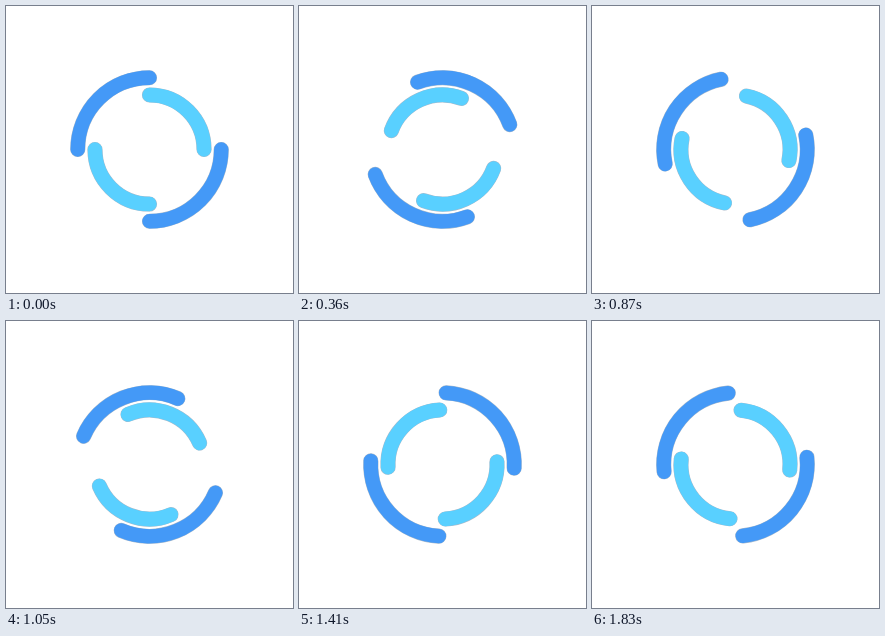
Write an HTML page with a canvas that moves like this. It is 287 by 287 pixels and loops after 1860 ms.

```html
<!DOCTYPE html>
<html lang="en">
<head>
<meta charset="utf-8">
<title>Double ring spinner</title>
<style>
  html, body { margin: 0; width: 100%; height: 100%; overflow: hidden; background: #fff; }
  canvas { display: block; width: 287px; height: 287px; }
</style>
</head>
<body>
<canvas id="stage"></canvas>
<script>
const SIZE = 287, UNIT = SIZE / 100;
const LOOP = 1860, STEP = 30;
const QUARTER = Math.PI / 2;
const WIDTH = 5 * UNIT, RIM = 0.8;
const canvas = document.getElementById('stage');
const ctx = canvas.getContext('2d');
const dpr = window.devicePixelRatio || 1;

canvas.width = canvas.height = Math.round(SIZE * dpr);
ctx.scale(dpr, dpr);
ctx.lineCap = 'round';

function stroke(color, width) {
  ctx.strokeStyle = color;
  ctx.lineWidth = width;
  ctx.stroke();
}

// Two opposite quarter arcs with round ends and a fine grey rim
function ring(radius, color, start) {
  for (const a of [start, start + Math.PI]) {
    ctx.beginPath();
    ctx.arc(SIZE / 2, SIZE / 2, radius * UNIT, a, a + QUARTER);
    stroke('#a9b9c9', WIDTH + RIM);
    stroke(color, WIDTH);
  }
}

function draw(ms) {
  const t = Math.floor((ms % LOOP) / STEP) * STEP;
  const turn = 2 * Math.PI * t / LOOP;
  ctx.fillStyle = '#fff';
  ctx.fillRect(0, 0, SIZE, SIZE);
  ring(25, '#4499f7', turn);
  ring(19, '#59d0ff', QUARTER - turn);
}

const begin = performance.now();
function tick() {
  draw(performance.now() - begin);
  requestAnimationFrame(tick);
}
tick();
</script>
</body>
</html>
```
